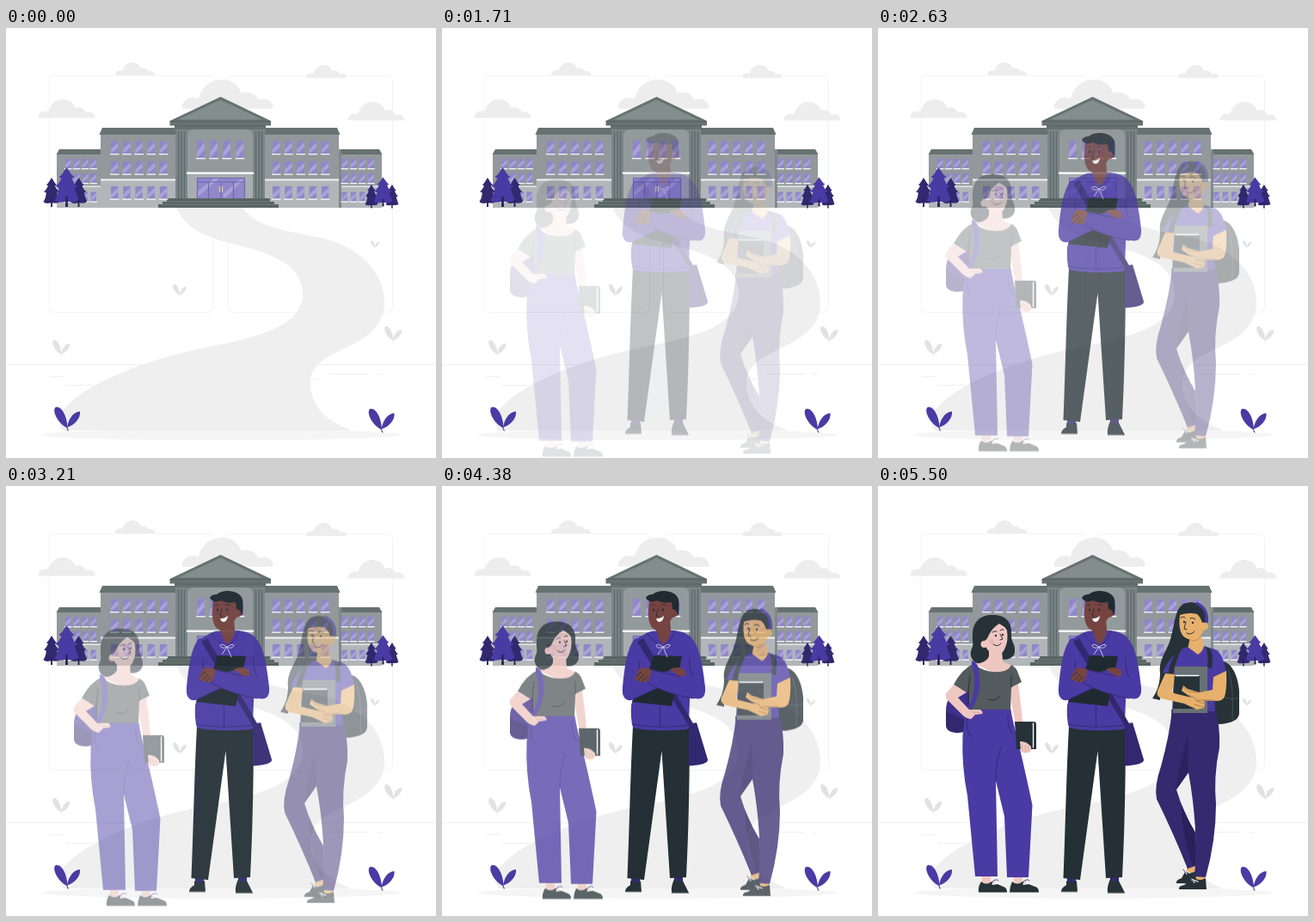
An HTML page that plays this animation: 500x500 px, repeating every 5540 ms.

```html
<!DOCTYPE html>
<html lang="en">
<head>
<meta charset="utf-8">
<title>Students on campus</title>
<style>
  html, body { margin: 0; height: 100%; overflow: hidden; background: #fff; }
  svg { display: block; width: 100vw; height: 100vh; }
  :root { --main: #4a3aa3; --deep: #33286f; --ink: #263238; }
  .main { fill: var(--main); }
  .deep { fill: var(--deep); }
  .ink { fill: var(--ink); }
  .wall { fill: #92989b; }
  .base { fill: #b2b6b8; }
  .roof { fill: #667271; }
  .line { fill: none; stroke: var(--ink); stroke-width: 1; stroke-linecap: round; stroke-linejoin: round; }
  .fold { fill: none; stroke: var(--deep); stroke-width: .9; stroke-linecap: round; }
  .white { fill: none; stroke: #fff; stroke-width: 1.3; stroke-linecap: round; }
  .brown { fill: #764440; }
  .pink { fill: #efc7c1; }
  .tan { fill: #e7b06c; }
  #man { animation: fade 5540ms infinite; }
  .rise { animation: rise 5540ms linear infinite; }
  @keyframes fade {
    0%, 9.03% { opacity: 0; animation-timing-function: ease-in-out; }
    67.7%, 100% { opacity: 1; }
  }
  @keyframes rise {
    0%, 19.1% { opacity: 0; transform: translateY(30.5px); }
    99.28%, 100% { opacity: 1; transform: none; }
  }
</style>
</head>
<body>
<svg viewBox="0 0 500 500">
  <defs>
    <path id="cloud" d="M0 21.5C0 15 6 12 12 14C14 6 20 0 29 0C36 0 41 4 43 10C49 8 54 11 55 15C61 13 66 16 66 21.5Z"/>
    <g id="tree">
      <path d="M14 0C17 4 19 9 23 11L20 13C22 18 24 20 27 22L23 24C25 30 27 34 28 38C24 41 20 40 17 40H11C8 41 3 41 0 38C3 34 4 30 5 24L1 22C4 20 6 17 8 13L5 11C9 9 11 4 14 0Z"/>
      <path d="M13 34H15L15.5 46H12.5Z" fill="#292052"/>
    </g>
    <g id="sprout">
      <path d="M14.500 24C5 20-3 5 1.500 .5C8-2 15 10 15.500 24Z"/>
      <path d="M15 24C17 11 25 5 30 5.500C31 12 25 21 15 24Z"/>
      <path d="M14 21L17 28H15.800L13 21Z"/>
    </g>
  </defs>

  <!-- backdrop -->
  <g fill="none" stroke="#f3f3f3">
    <rect x="49" y="55.500" width="192.500" height="275" rx="6"/>
    <rect x="257.500" y="55.500" width="192" height="275" rx="6"/>
    <path stroke="#f0f0f0" d="M0 391.500H500M51 405.500H67M69 415.500H102M357 408.500H368M376 402.500H422M431 402.500H437"/>
  </g>
  <g fill="#ededed">
    <use href="#cloud" transform="translate(127 40) scale(.7)"/>
    <use href="#cloud" transform="translate(37.500 83)"/>
    <use href="#cloud" transform="translate(204.500 60) scale(1.610 1.570)"/>
    <use href="#cloud" transform="translate(349 43) scale(.71)"/>
    <use href="#cloud" transform="translate(397.500 86)"/>
  </g>
  <ellipse cx="250" cy="473" rx="209" ry="6.500" fill="#f5f5f5"/>
  <path fill="#efefef" d="M198 208H275C290 234 333 236 370 245C414 256 440 287 440 319C440 377 354 368 354 413C354 443 377 459 402 468H66C62 463 61 457 63 450C76 424 142 390 230 372C292 360 345 347 345 309C345 276 310 263 275 254C232 243 209 235 198 208Z"/>

  <!-- school -->
  <g id="school">
    <g id="outer">
      <path class="wall" d="M59 146H110V184H59Z"/>
      <path class="base" d="M59 184H110V209H59Z"/>
      <path class="roof" d="M62 141H110V147H58.500Z"/>
      <path fill="#e9eaea" d="M59 183.500H110V185H59Z"/>
    </g>
    <g id="inner">
      <path class="wall" d="M110 123H198V176H110Z"/>
      <path class="base" d="M110 177H198V209H110Z"/>
      <path class="roof" d="M112 116H198V124H108.500Z"/>
      <path fill="#f3f3f3" d="M110 175.500H198V177.500H110Z"/>
    </g>
    <use href="#outer" transform="matrix(-1 0 0 1 496 0)"/>
    <use href="#inner" transform="matrix(-1 0 0 1 497 0)"/>
    <path fill="#7f898a" d="M387 141H390V209H387Z"/>
    <path fill="#7c8587" d="M197 114H301V200H197Z"/>
    <path fill="#939a9c" d="M211 200V126Q211 118 219 118H279Q287 118 287 126V200Z"/>
    <path fill="#a8adaf" d="M211 170H287V200H211Z"/>
    <path fill="#f7f7f7" d="M210 167.500H288V170H210Z"/>
    <path fill="none" stroke="#5e6a6b" stroke-width="1.400" d="M200.500 120V198M204 120V198M207.500 120V198M290.500 120V198M294 120V198M297.500 120V198"/>
    <path class="roof" d="M190.500 108L249.500 80L308 108V113.500H302V118H196V113.500H190.500Z"/>
    <path fill="#838d8e" d="M200 106.500L249.500 83.500L298 106.500Z"/>
    <path fill="none" stroke="#56615f" d="M190.500 108.500H308M196 114H302"/>
    <path fill="#9188c9" d="M222 174H278V199H222Z"/>
    <path fill="#aaa2d8" d="M223 190L242 175H248L223 196ZM252 194L272 176H277L254 198Z"/>
    <path fill="none" stroke="#7166b5" stroke-width="1.200" d="M222.500 199V174.500H277.500V199M235.500 179V199M250 179V199M264.500 179V199M222 179H278"/>
    <path fill="none" stroke="#e9d58c" stroke-width="1.200" d="M248.500 184V191M251.500 184V191"/>
    <path fill="#586564" d="M187 198H307V202H312V205H317V209H177V205H182V202H187Z"/>
    <path fill="none" stroke="#76817f" stroke-width=".7" d="M187 202H307M182 205.300H312"/>
  </g>

  <!-- plants -->
  <g class="deep">
    <use href="#tree" transform="translate(43.500 174) scale(.68 .74)"/>
    <use href="#tree" transform="translate(75 174) scale(.68 .74)"/>
    <use href="#tree" transform="translate(417.500 182) scale(.53 .6)"/>
    <use href="#tree" transform="translate(441.500 182) scale(.53 .6)"/>
  </g>
  <g class="main">
    <use href="#tree" transform="translate(56.500 162)"/>
    <use href="#tree" transform="translate(427.500 173.500) scale(.78 .74)"/>
    <use href="#sprout" transform="translate(56 440.500)"/>
    <use href="#sprout" transform="translate(421.500 442.500)"/>
  </g>
  <g fill="#e2e2e2">
    <use href="#sprout" transform="translate(54 363) scale(.67)"/>
    <use href="#sprout" transform="translate(194 298) scale(.52)"/>
    <use href="#sprout" transform="translate(440 347) scale(.67)"/>
    <use href="#sprout" transform="translate(424 247) scale(.33)"/>
  </g>

  <!-- student with shoulder bag -->
  <g id="man">
    <path class="deep" d="M220 455H230V465H220ZM270 453H280V464H270Z"/>
    <path class="ink" d="M219 459Q225 463 231 459L232 472H213Q213 467 219 464ZM270 457Q275 462 280 459L287 473H267Q266 466 270 457Z"/>
    <path fill="none" stroke="#919799" stroke-width="1.200" d="M213 472H232M267 473.300H287"/>
    <path fill="#243036" d="M222 279H288C288 330 287 400 284 455L265 456L255.500 308L235 458L215.500 456C218 395 219 335 222 279Z"/>
    <path class="line" stroke-width=".6" d="M256 285L255.500 307" stroke="#4b575d"/>
    <path class="deep" d="M287 277L296 275L309 318Q310 324 287 325.500Z"/>
    <path class="brown" d="M249 160L265 155L267 178L257 187L248 178Z"/>
    <path class="main" d="M236 172C243 168 247 168 250 169Q252 180 257 184Q264 180 266 168C276 168 283 170 290 176L289 225L287 276Q288 282 285 283C262 285 238 285 222 281Q219 270 220 255L226 232L222 180Z"/>
    <path class="main" d="M225 177C214 188 212 216 210 234C209 245 213 250 221 249L236 236L236 180Z"/>
    <path class="main" d="M283 172C298 178 302 200 306 234C307 245 302 249 294 247L278 236L280 180Z"/>
    <path class="fold" d="M238 171Q248 184 256 186Q266 183 271 169M229 203Q231 216 226 225M288 200Q287 213 292 222M221 277Q253 283 287 278M253.500 256V281"/>
    <path class="deep" d="M227 181L234 177L292 276L287 279Z"/>
    <path fill="#1f2a30" d="M246 197L279 198L267 256L221 251L238 224Z"/>
    <path class="brown" d="M265 213Q276 208 283 215L283 223L268 223Z"/>
    <path class="main" d="M213 230L266 214L278 222Q264 228 250 235L223 248Q211 252 210 239Z"/>
    <path class="fold" d="M222 248L250 235"/>
    <path class="main" d="M243 213L277 221Q301 219 305 236Q305 248 293 247Q265 243 239 230Z"/>
    <path class="fold" d="M243 214L239 229Q262 242 292 247M243 214L276 221"/>
    <path class="brown" d="M244 214Q234 209 229 213L224 224Q231 230 240 227Z"/>
    <path class="line" stroke-width=".6" d="M226 221L232 216M229 225L235 219M233 227L238 222"/>
    <path fill="none" stroke="#c8c2e6" stroke-width="1" d="M257 187Q250 182 249 186Q251 190 257 187Q265 182 265 186Q262 190 257 187L251 196M257 187L262 199"/>
    <path class="brown" d="M241 133Q249 127 270 134Q275 143 272 152Q267 152 265 158C262 166 252 170 246 166C239 161 239 146 241 133Z"/>
    <circle class="brown" cx="271.500" cy="147" r="4"/>
    <path fill="#1f2b31" d="M237 130Q239 126 245 126C252 120 267 121 273 128C277 133 276 143 274 152Q274 144 268 143L267 135Q257 137 250 133Q241 137 237 130Z"/>
    <path class="line" d="M243 139Q245 137 247 138M256 138Q258 136 261 139M251 143L249 151L252 151.500"/>
    <ellipse class="ink" cx="246" cy="144" rx="1.100" ry="1.800"/>
    <ellipse class="ink" cx="257" cy="144" rx="1.100" ry="1.800"/>
    <path fill="#fff" d="M249 154Q254 155 258 151Q257 158 253 158Q250 158 249 154Z"/>
    <path class="white" d="M274 151.500H276"/>
  </g>

  <!-- student with hand on hip -->
  <g class="rise">
    <path class="deep" d="M105 236H92Q79 246 79 262V279Q80 287 94 287L112 284V240Z"/>
    <path class="main" d="M92 238Q79 246 79 262L104 273V238Z" opacity=".5"/>
    <path class="ink" d="M110 173C110 157 120 149.500 134 150C150 150 156 160 155 172C154 180 160 184 159 193C157 202 147 203 141 201L131 198Q129 205 121 207C111 207 105 198 109 189C112 184 109 180 110 173Z"/>
    <path class="pink" d="M121 454H131V464H121ZM158 454H168V464H158Z"/>
    <path class="ink" d="M120 460Q126 465 132 460L146 466Q150 467 150 472.500H117Q116 466 120 460ZM156 460Q162 465 168 460L183 466Q187 467 187 472.500H153Q153 466 156 460Z"/>
    <path class="white" stroke-width=".9" d="M133 463Q137 456 139 459Q138 463 133 463L141 462M169 463Q173 456 175 459Q174 463 169 463L177 462"/>
    <path class="fold" d="M133 460Q138 456 140 459M169 460Q174 456 176 459"/>
    <path class="pink" d="M152 226L163 229L167 262L170 300H165L162 285Q156 262 152 226Z"/>
    <path class="pink" d="M129 190H144L145 204L156 209Q149 222 136 218L113 207Q127 205 129 198Z"/>
    <path fill="#545b5e" d="M112 206C117 213 133 219 147 215Q153 213 155 208Q161 211 163 218L167 228L155 234L154 262H106L106 237L103 240L88 231Q97 213 112 206Z"/>
    <path class="line" stroke-width=".7" d="M107 220L105 237M128 248Q138 251 142 244M155 220V234"/>
    <path class="main" d="M109 203Q115 204 117 213Q121 235 113 252L106 264L104 257Q113 245 112 230Q112 214 109 209Z"/>
    <path class="main" d="M102 260H154.500C157 277 162 291 165 306Q173 340 179.500 371L175 455L150 455L147 384L137 343L139 454L113 454L104 360Q97 325 98.500 290Z"/>
    <path class="fold" d="M104 267Q101 283 108 292M151 267Q150 280 157 289M137 343Q137 320 143 304"/>
    <path class="ink" d="M159 274H181Q184 274 184 277V306H161Z"/>
    <path class="white" d="M180.500 276V304"/>
    <path class="pink" d="M165 297Q172 296 178 303L178 308Q172 313 166 308Z"/>
    <path class="pink" d="M88 231L103 240Q98 243 93 246L106 260L119 260Q123 263 121 265L113 266L108 271Q101 270 96 264L80 248Q77 244 80 240Z"/>
    <path fill="none" stroke="#cf9c98" stroke-width=".7" d="M112 263L121 264M167 300L168 308M171 302L172 309M174 303L175 308M108 260L113 266"/>
    <path class="pink" d="M123 174Q129 163 140 159Q147 161 150 168Q152 181 147 190C142 200 130 196 126 188Z"/>
    <circle class="pink" cx="123.500" cy="184" r="4"/>
    <path class="ink" d="M123 180C119 168 124 157 136 155Q148 154 152 169Q147 163 141 160Q133 165 129 173Q127 179 123 180Z"/>
    <path class="line" stroke-width=".8" d="M133 170Q135 168 138 169M142 168Q144 166 146 167M142 172L145 178L142 179M134 184Q139 188 143 183"/>
    <circle class="ink" cx="137" cy="174" r="1.200"/>
    <circle class="ink" cx="145" cy="173" r="1.200"/>
    <circle cx="132" cy="181" r="3" fill="#e7aaa5" opacity=".6"/>
  </g>

  <!-- student with books -->
  <g class="rise">
    <path class="ink" d="M391 204C409 199 418 217 420 238V265Q419 275 397 277L384 274Z"/>
    <path fill="none" stroke="#4b575d" stroke-width=".8" d="M404 246Q413 249 419 246M407 214Q414 230 412 272"/>
    <path class="ink" d="M355 137C369 132 384 139 384 158L368 168L362 186C352 196 346 213 342 228Q336 244 328 242L328 249L319 247C325 238 328 229 328 217C326 202 337 190 340 178C345 164 344 145 355 137Z"/>
    <path class="tan" d="M359 440H369V451H359ZM369 451H380V460H369Z"/>
    <path class="ink" d="M358 447Q364 452 369 448L370 459Q364 463 355 462L347 462Q346 458 353 456ZM368 456Q374 460 381 456L382 469H350Q349 465 356 464Z"/>
    <path class="white" stroke-width=".9" d="M359 451L356 447L363 450M368 461L364 457L372 460"/>
    <path class="fold" d="M358 450L355 446M367 460L363 456"/>
    <path fill="#35296f" d="M342 260L361 333L347 353Q355 380 369 403L371 441L360 445Q344 405 324 364Q321 349 329 326Q339 290 342 260Z"/>
    <path fill="#2a205b" d="M353 371Q360 388 369 403L371 441L366 442Q352 400 353 371Z"/>
    <path fill="#35296f" d="M341 260H392Q398 278 397 304Q390 338 393 370Q393 412 381 455L368 454Q373 400 361 333L345 300Z"/>
    <path fill="#2a205b" d="M360 291Q349 328 347 353L361 333Z" opacity=".75"/>
    <path class="tan" d="M363 176H377L379 187L382 191L372 198L360 190Z"/>
    <path class="main" d="M360 187L372 196Q378 192 379 186L392 190Q401 194 405 216L390 222L392 262H342L344 218L331 217Q342 192 360 187Z"/>
    <path class="ink" d="M350 188L355 186Q345 204 343 220L337 221Q339 203 350 188ZM381 187L387 190Q390 200 388 213L383 210Q385 199 381 187Z"/>
    <path class="tan" d="M334 218L346 219L342 239L349 244L331 247Q323 246 325 238Z"/>
    <path fill="#687174" d="M345 210H383V264H343Z"/>
    <path class="ink" d="M345 220H374V259H343Z"/>
    <path class="white" d="M346 220.500H373"/>
    <path class="tan" d="M390 222L405 215Q406 236 403 245Q401 250 393 250L370 249Q362 245 353 238L355 232L360 236L374 240L389 237Z"/>
    <path class="tan" d="M333 230L344 241Q359 245 372 247Q380 248 380 253L379 258L371 260L356 253L329 247Z"/>
    <path fill="none" stroke="#9b693b" stroke-width=".7" d="M354 233L361 239L374 240M361 243L370 247M370 250L379 253M368 254L378 257M369 249H392"/>
    <path class="tan" d="M351 150Q359 145 379 151Q382 167 375 174Q369 182 361 178C352 176 349 165 351 150Z"/>
    <circle class="tan" cx="379.500" cy="163" r="4.500"/>
    <path class="ink" d="M347 151C349 137 361 132 373 138Q381 143 383 158L377 159Q375 152 370 148Q359 147 347 151Z"/>
    <path fill="none" stroke="#4a3aa3" stroke-width="3.500" d="M370 136Q384 142 382 159"/>
    <path class="line" stroke-width=".8" d="M352 153Q354 151 357 153M363 154Q365 152 369 155M358 158L356 166L359 167M359 171Q364 174 368 169"/>
    <circle class="ink" cx="356" cy="158" r="1.200"/>
    <circle class="ink" cx="366" cy="159" r="1.200"/>
    <path fill="none" stroke="#b97d43" stroke-width=".8" d="M364 179Q370 182 375 175"/>
  </g>
</svg>
<script>
  const school = document.getElementById('school');

  function pane(x, y, w, h) {
    const at = k => y + h * k;
    return `<path fill="#9087c9" d="M${x} ${y}h${w}v${h}h${-w}Z"/>
      <path fill="#aaa2d9" d="M${x} ${at(.65)}L${x + w} ${at(.1)}V${at(.5)}L${x} ${at(1)}Z"/>
      <path fill="#f0f0f3" d="M${x - 1} ${y + h}h${w + 2}v1.400h${-w - 2}Z"/>`;
  }

  function grid(x, count, step, rows, w, h) {
    let out = '';
    for (const y of rows)
      for (let i = 0; i < count; i++) out += pane(x + i * step, y, w, h);
    return out;
  }

  const windows = document.createElementNS('http://www.w3.org/2000/svg', 'g');
  windows.innerHTML =
    grid(69, 4, 9.8, [152, 169, 190.5], 6.5, 11) +
    grid(390.5, 4, 10.2, [152, 169, 190.5], 6.5, 11) +
    grid(122, 5, 14.2, [131.5, 155, 184], 8.5, 14.5) +
    grid(310, 5, 14.2, [131.5, 155, 184], 8.5, 14.5) +
    grid(222, 4, 15.2, [131], 8.8, 20);
  school.append(windows);
</script>
</body>
</html>
```
